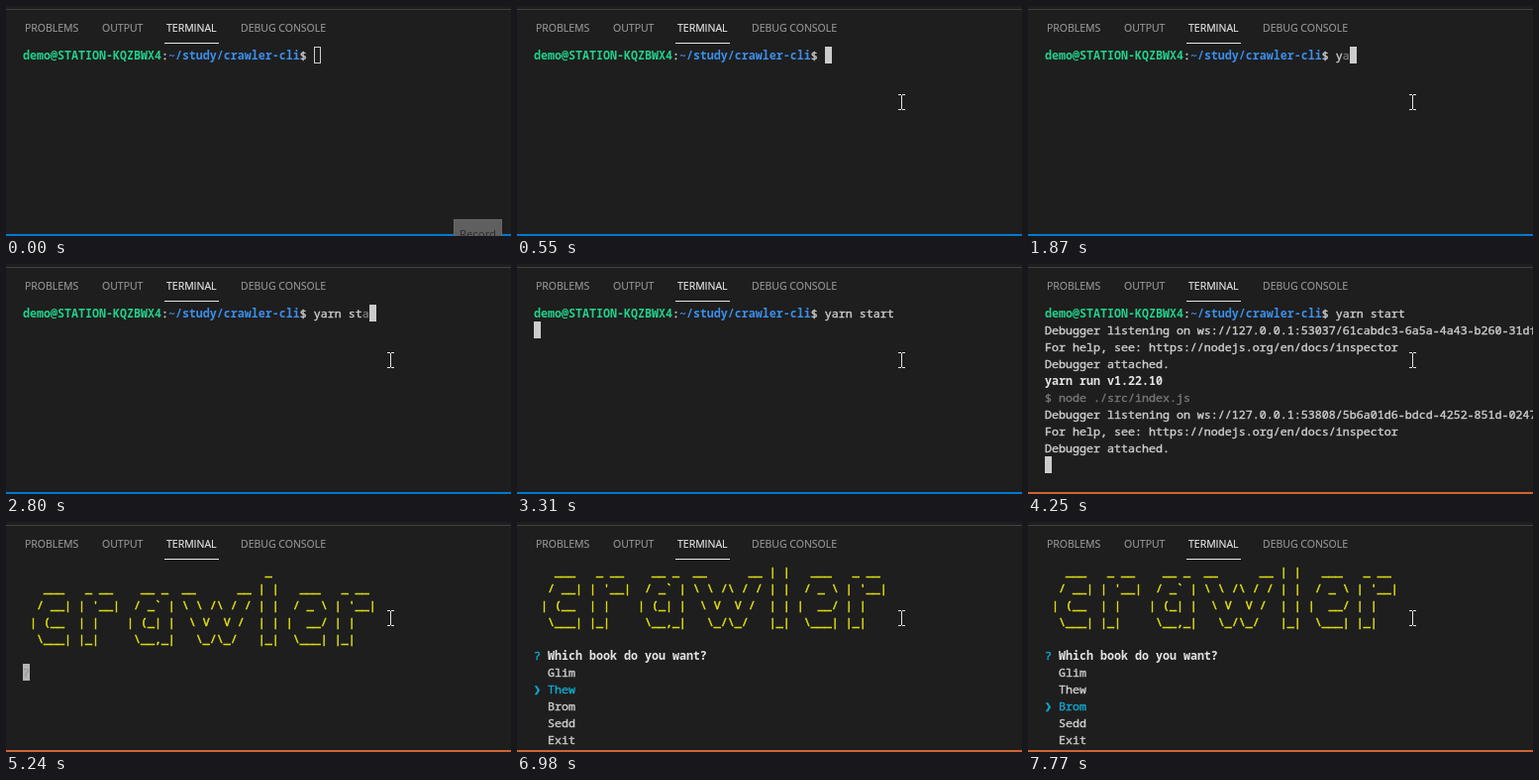
An HTML page for the animation above (8 s loop, 510 by 232 pixels).

```html
<!DOCTYPE html>
<html lang="en">
<head>
<meta charset="utf-8">
<title>Terminal session</title>
<style>
  html, body { margin: 0; width: 100%; height: 100%; overflow: hidden; background: #1e1e1e; }
  #stage { position: relative; width: 510px; height: 232px; overflow: hidden; background: #1e1e1e; }
  #stage > * { position: absolute; }
  .edge { left: 0; top: 3px; width: 510px; height: 1px; background: #414141; }
  .tab {
    top: 14px; color: #979797; white-space: nowrap;
    font: 10.5px/16px "Open Sans", "Noto Sans", sans-serif;
    -webkit-text-stroke: .15px;
  }
  .tab.on { color: #e7e7e7; }
  .line { left: 160px; top: 37px; width: 55px; height: 1px; background: #e7e7e7; }
  #term {
    left: 17px; top: 41px; width: 493px; height: 187px; overflow: hidden;
    color: #ccc; white-space: pre;
    font: 11.6667px/17px "Noto Sans Mono", "DejaVu Sans Mono", monospace;
    font-variant-ligatures: none;
    -webkit-text-stroke: .4px;
  }
  #term div { height: 17px; }
  #term b { -webkit-text-stroke: 0; }
  .green { color: #23d18b; }
  .blue { color: #3b8eea; }
  .cyan { color: #11a8cd; }
  .yellow { color: #e5e510; -webkit-text-stroke: .5px; }
  .white { color: #e5e5e5; }
  .dim { color: #757575; }
  .cur {
    display: inline-block; box-sizing: border-box; width: 7px; height: 17px;
    vertical-align: top; background: #ccc; color: #999;
  }
  .cur.idle { background: none; border: 1px solid #ccc; }
  .cur.soft { background: #b4b4b4; }
  #status { left: 0; top: 230px; width: 510px; height: 2px; }
  #record {
    left: 452px; top: 215px; width: 49px; height: 28px; box-sizing: border-box;
    border: 1px solid #686868; background: #5f5f5f; color: #2b2b2b; text-align: center;
    font: 11.4px/27px "Open Sans", "Noto Sans", sans-serif;
  }
  #mouse { left: 0; top: 0; overflow: visible; }
</style>
</head>
<body>
<div id="stage">
  <div class="edge"></div>
  <div class="tab" style="left:19px">PROBLEMS</div>
  <div class="tab" style="left:97px">OUTPUT</div>
  <div class="tab on" style="left:162px">TERMINAL</div>
  <div class="tab" style="left:237px">DEBUG CONSOLE</div>
  <div class="line"></div>
  <div id="term"></div>
  <div id="status"></div>
  <div id="record">Record</div>
  <svg id="mouse" width="14" height="20">
    <path id="arrow" d="M.5 .5v15.5l3.6-3.4 2.4 5.6 2.3-1-2.4-5.4h5z" fill="#fff" stroke="#000"/>
    <path id="beam" d="M0 .5h3m1 0h3M3.5 1v14M0 15.5h3m1 0h3" fill="none" stroke="#e4e4e4"/>
  </svg>
</div>

<script type="text/plain" id="logo">
                                   _
   ___   _ __    __ _  __      __ | |   ___   _ __
  / __| | '__|  / _` | \ \ /\ / / | |  / _ \ | '__|
 | (__  | |    | (_| |  \ V  V /  | | |  __/ | |
  \___| |_|     \__,_|   \_/\_/   |_|  \___| |_|
</script>

<script>
const LOOP = 8000;
const $ = id => document.getElementById(id);
const tint = (cls, s) => `<span class="${cls}">${s}</span>`;
const bold = (cls, s) => `<b class="${cls}">${s}</b>`;
const cursor = (kind = "", s = "") => `<span class="cur ${kind}">${s}</span>`;

const prompt = bold("green", "demo@STATION-KQZBWX4") + ":" +
  bold("blue", "~/study/crawler-cli") + "$ ";
const typed = (s, fresh) =>
  [prompt + (fresh ? s.slice(0, -1) + tint("dim", s.slice(-1)) : s) + cursor()];

const listening = tail => `Debugger listening on ws://127.0.0.1:${tail}`;
const help = "For help, see: https://nodejs.org/en/docs/inspector";
const attached = "Debugger attached.";
const session = [
  prompt + "yarn start",
  listening("53037/61cabdc3-6a5a-4a43-b260-31df"), help, attached,
  bold("white", "yarn run v1.22.10"),
  tint("dim", "$ node ./src/index.js"),
  listening("53808/5b6a01d6-bdcd-4252-851d-0247"), help, attached
];
const output = n => [...session.slice(0, n), cursor()];

const logo = $("logo").textContent.split("\n").slice(1, 6).map(s => tint("yellow", s));
const books = ["Glim", "Thew", "Brom", "Sedd", "Exit"];
const menu = (pick, hint = "") => [
  ...logo.slice(1), "",
  tint("cyan", "?") + " " + bold("white", "Which book do you want?") + hint,
  ...books.map((b, i) => i === pick ? tint("cyan", "❯ " + b) : "  " + b)
];

const screens = [
  [0, [prompt + cursor("idle")]],
  [550, typed("")],
  [1870, typed("ya", true)],
  [1950, typed("yar", true)],
  [2030, typed("yarn", true)],
  [2110, typed("yarn")],
  [2190, typed("yarn ")],
  [2390, typed("yarn s", true)],
  [2480, typed("yarn s")],
  [2570, typed("yarn st", true)],
  [2660, typed("yarn st")],
  [2800, typed("yarn sta", true)],
  [2890, typed("yarn sta")],
  [2980, typed("yarn star", true)],
  [3070, typed("yarn start", true)],
  [3160, typed("yarn start")],
  [3250, output(1)],
  [3350, output(2)],
  [3440, output(3)],
  [3780, output(4)],
  [4110, output(6)],
  [4180, output(8)],
  [4250, output(9)],
  [5240, [...logo, "", cursor("soft", "?")]],
  [5310, menu(0, " (Use arrow keys)")],
  [6980, menu(1)],
  [7770, menu(2)]
];

// time, x, y of the pointer
const path = [[0, 460, 240], [70, 455, 205], [160, 422, 150], [250, 395, 104], [340, 385, 89]];

const at = (list, t) => list.findLast(e => e[0] <= t);
let shown;

function draw(t) {
  const screen = at(screens, t);
  if (screen !== shown) {
    shown = screen;
    $("term").innerHTML = screen[1].map(s => `<div>${s}</div>`).join("");
  }
  const [, x, y] = at(path, t);
  $("mouse").style.transform = `translate(${x}px, ${y}px)`;
  $("arrow").style.display = t < 480 ? "" : "none";
  $("beam").style.display = t < 480 ? "none" : "";
  $("record").style.display = t < 70 ? "" : "none";
  $("status").style.background = t < 3710 ? "#007acc" : "#cc6633";
}

const start = performance.now();
function tick() {
  draw((performance.now() - start) % LOOP);
  requestAnimationFrame(tick);
}
tick();
</script>
</body>
</html>
```
